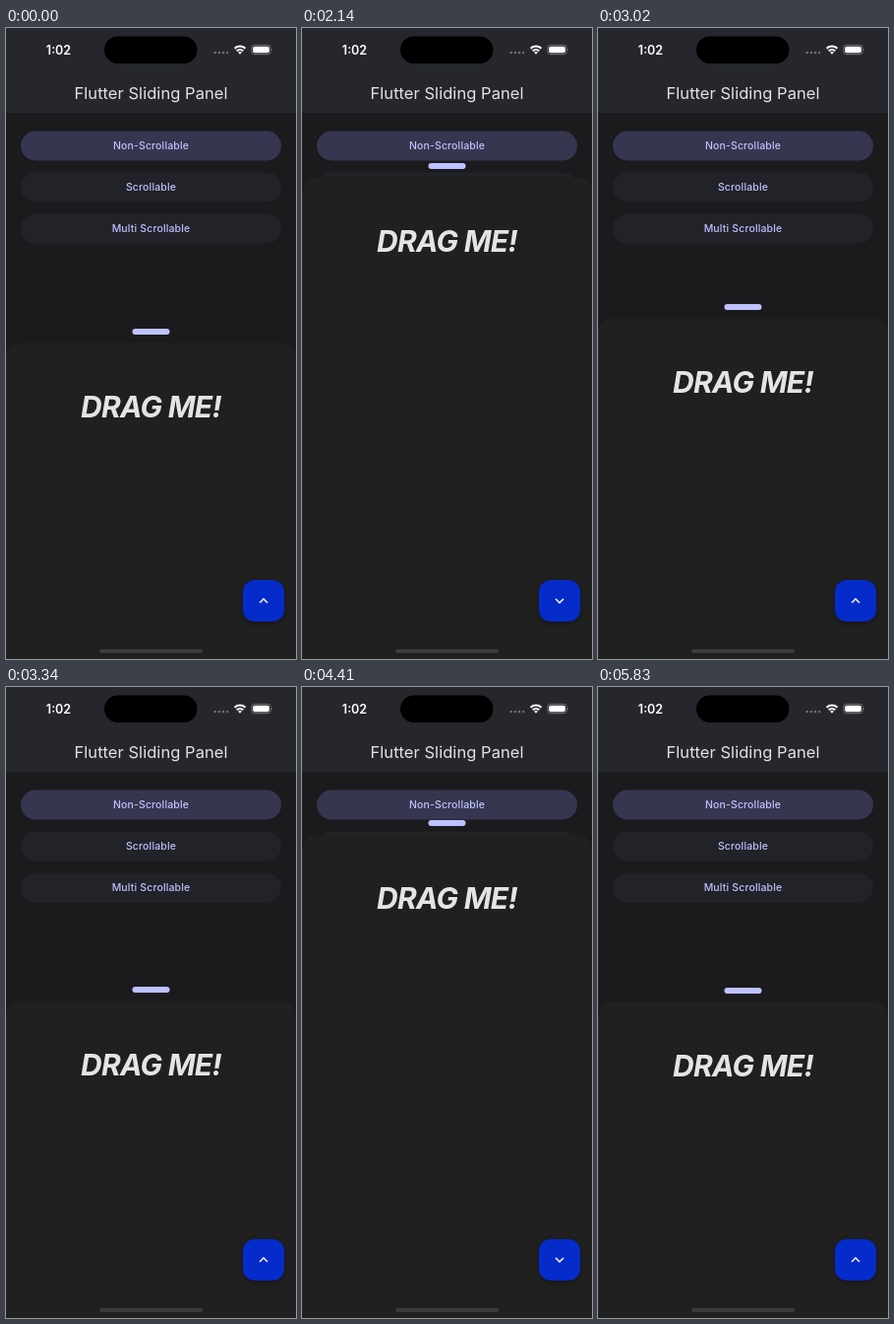
Recreate the animation shown at these times as an HTML page. Size 295 px wide and 640 px high, loop 5.87 s.

```html
<!DOCTYPE html>
<html lang="en">
<head>
<meta charset="utf-8">
<title>Sliding panel</title>
<style>
  html, body { margin: 0; width: 100%; height: 100%; overflow: hidden; background: #1b1b1e; }
  svg { display: block; width: 295px; height: 640px; }
  text { font-family: Inter, Roboto, sans-serif; text-anchor: middle; }
  .clock { font-size: 12.5px; font-weight: 600; fill: #fff; }
  .title { font-size: 16.5px; fill: #e3e2e6; letter-spacing: .05px; }
  .label { font-size: 10.5px; font-weight: 500; fill: #bec2ff; letter-spacing: .15px; }
  .drag { font-size: 30px; font-weight: 700; font-style: italic; fill: #e4e4e6; letter-spacing: -.7px; }
</style>
</head>
<body>
<svg viewBox="0 0 295 640">
  <defs>
    <clipPath id="fabClip"><rect x="241" y="560" width="42" height="42" rx="12"/></clipPath>
    <filter id="soft" x="-30%" y="-30%" width="160%" height="160%"><feGaussianBlur stdDeviation="2.5"/></filter>
  </defs>

  <rect width="295" height="640" fill="#1b1b1e"/>
  <rect width="295" height="86" fill="#25272d"/>

  <!-- status bar -->
  <text class="clock" x="53.5" y="26.5">1:02</text>
  <rect x="100" y="8.5" width="94.500" height="27.500" rx="13.750" fill="#000"/>
  <g fill="#6c6e73">
    <circle cx="212.700" cy="25" r="1.300"/><circle cx="216.900" cy="25" r="1.300"/>
    <circle cx="221" cy="25" r="1.300"/><circle cx="225.100" cy="25" r="1.300"/>
  </g>
  <g fill="none" stroke="#fff" stroke-width="1.900">
    <path d="M232.500 20.700a8 8 0 0 1 11 0M234.700 23.200a4.900 4.900 0 0 1 6.600 0"/>
  </g>
  <path d="M238 26.700l-2-2.100a2.900 2.900 0 0 1 4 0z" fill="#fff"/>
  <rect x="249.800" y="17.300" width="19.400" height="9.400" rx="3" fill="none" stroke="#85878b" stroke-width=".8"/>
  <rect x="251.200" y="18.700" width="16.600" height="6.600" rx="1.800" fill="#fff"/>
  <path d="M270.300 20.500q1.300 1.500 0 3z" fill="#85878b"/>

  <text class="title" x="147.500" y="71.500">Flutter Sliding Panel</text>

  <rect x="15" y="104.500" width="265" height="30" rx="15" fill="#363650"/>
  <rect x="15" y="146.500" width="265" height="30" rx="15" fill="#222329"/>
  <rect x="15" y="188.500" width="265" height="30" rx="15" fill="#222329"/>
  <text class="label" x="147.500" y="123.300">Non-Scrollable</text>
  <text class="label" x="147.500" y="165.300">Scrollable</text>
  <text class="label" x="147.500" y="207.300">Multi Scrollable</text>

  <g id="panel">
    <rect x="0" y="319.500" width="295" height="600" rx="15" fill="#202020"/>
    <rect x="128.500" y="305" width="38" height="6" rx="3" fill="#bec2ff"/>
    <text class="drag" x="147.500" y="395.300">DRAG ME!</text>
  </g>

  <rect x="95" y="630" width="105" height="4" rx="2" fill="#3b3b3b"/>

  <rect x="241" y="562" width="42" height="42" rx="12" fill="#000" opacity=".3" filter="url(#soft)"/>
  <rect x="241" y="560" width="42" height="42" rx="12" fill="#052bcb"/>
  <g id="ink" clip-path="url(#fabClip)" fill="#dfe0ff">
    <rect x="241" y="560" width="42" height="42" opacity=".35"/>
    <circle id="ripple" cx="258" cy="580"/>
  </g>
  <path id="arrow" fill="#fff" transform="translate(253 572) scale(.75)"/>
</svg>

<script>
const LOOP = 5870, TRAVEL = 170, RATE = 0.012;
const UP = 'M7.41 15.41L12 10.83l4.59 4.58L18 14l-6-6-6 6z';
const DOWN = 'M7.41 8.59L12 13.17l4.59-4.58L18 10l-6 6-6-6z';

// Each move: when the spring is released, where it goes, and its visible steps.
const moves = [
  { start: 1600, open: true, steps: [1590, 1700, 1810, 1920, 2030, 2140, 2260, 2360] },
  { start: 2737, open: false, steps: [2810, 2920, 3020, 3120, 3230, 3340, 3450] },
  { start: 3874, open: true, tap: true, steps: [3850, 3960, 4070, 4180, 4300, 4410] },
  { start: 5172, open: false, tap: true, steps: [5160, 5270, 5380, 5490, 5600, 5710, 5830] }
];
// Ripple radius and opacity per step after a tap.
const ripples = [[9, .12], [16, .16], [25, .12], [32, .06]];

const $ = id => document.getElementById(id);
const panel = $('panel'), arrow = $('arrow'), ink = $('ink'), ripple = $('ripple');

function remaining(ms) {
  const u = RATE * Math.max(0, ms);
  return (1 + u) * Math.exp(-u);
}

function poseAt(t) {
  const move = moves.filter(m => t >= m.steps[0]).pop();
  if (!move) return { lift: 0, open: false, ink: null };
  const { start, open, tap, steps } = move;
  const i = steps.filter(s => s <= t).length - 1;
  const left = i === steps.length - 1 ? 0 : remaining(steps[i] - start);
  return {
    lift: TRAVEL * (open ? 1 - left : left),
    open: steps[i] > start ? open : !open,
    ink: tap && ripples[i]
  };
}

function draw(t) {
  const pose = poseAt(t);
  panel.setAttribute('transform', `translate(0 ${-pose.lift.toFixed(2)})`);
  arrow.setAttribute('d', pose.open ? DOWN : UP);
  const [r, alpha] = pose.ink || [0, 0];
  ink.setAttribute('opacity', pose.ink ? 1 : 0);
  ink.firstElementChild.setAttribute('opacity', alpha * .35);
  ripple.setAttribute('r', r);
  ripple.setAttribute('opacity', alpha);
}

const begin = performance.now();
function tick() {
  draw((performance.now() - begin) % LOOP);
  requestAnimationFrame(tick);
}
tick();
</script>
</body>
</html>
```
